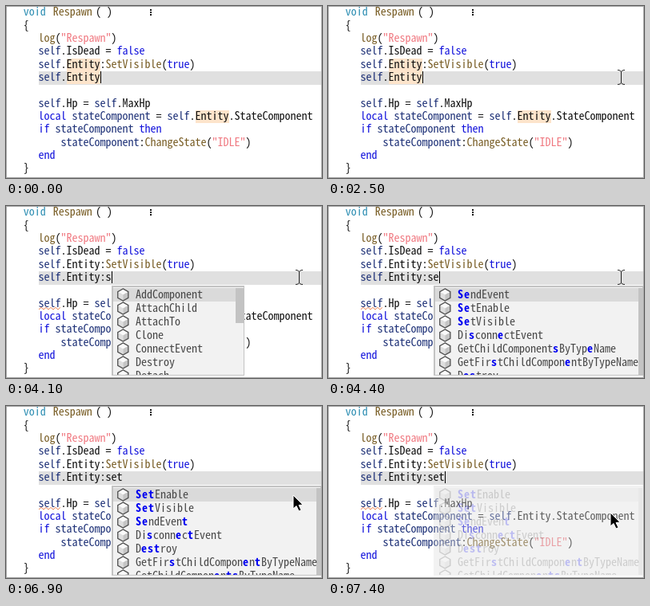
An HTML page with a canvas for the animation above (8 s loop, 395 px wide and 216 px high).

```html
<!DOCTYPE html>
<html lang="en">
<head>
<meta charset="utf-8">
<title>Code completion</title>
<style>
html, body { margin: 0; width: 100%; height: 100%; overflow: hidden; background: #fff; }
canvas { display: block; width: 395px; height: 216px; }
</style>
</head>
<body>
<canvas id="stage"></canvas>
<script>
const W = 395, H = 216, LOOP = 8000, CW = 7, LEFT = 41;
const canvas = document.getElementById('stage');
const ctx = canvas.getContext('2d');
const dpr = window.devicePixelRatio || 1;
canvas.width = W * dpr;
canvas.height = H * dpr;

const FAMILY = '"Noto Sans Mono CJK KR", "Noto Sans Mono CJK JP", "Noto Sans Mono", monospace';
ctx.font = `100px ${FAMILY}`;
const SIZE = CW * 100 / ctx.measureText('0').width;

const INK = '#111111', VAR = '#1f3278', KEY = '#1414dc', FN = '#795e26',
      STR = '#f07a82', TYPE = '#2f8fb3', MATCH = '#0000f0', ITEM = '#484848';

const SELF = ['self', VAR];
const CODE = [
  [2, ['log', FN], ['('], ['"Respawn"', STR], [')']],
  [3, SELF, ['.IsDead = '], ['false', KEY]],
  [4, SELF, ['.Entity:'], ['SetVisible', FN], ['('], ['true', KEY], [')']],
  [7, SELF, ['.Hp = '], SELF, ['.MaxHp']],
  [8, ['local ', KEY], ['stateComponent', VAR], [' = '], SELF, ['.Entity.StateComponent']],
  [9, ['if ', KEY], ['stateComponent ', VAR], ['then', KEY]],
  [10, ['    '], ['stateComponent', VAR], [':'], ['ChangeState', FN], ['('], ['"IDLE"', STR], [')']],
  [11, ['end', KEY]]
];

// Completion lists: label followed by the matched letter positions
const ALL = ['AddComponent', 'AttachChild', 'AttachTo', 'Clone', 'ConnectEvent', 'Destroy', 'Detach'].map(s => [s]);
const LIST_SE = [
  ['SendEvent', 0, 1], ['SetEnable', 0, 1], ['SetVisible', 0, 1], ['DisconnectEvent', 2, 7],
  ['GetChildComponentsByTypeName', 17, 23], ['GetFirstChildComponentByTypeName', 6, 19], ['Destroy', 1, 2]
];
const LIST_S = LIST_SE.map(([s, a, b]) => s === 'Destroy' ? [s, b] : [s, a]);
const LIST_SET = [
  ['SetEnable', 0, 1, 2], ['SetVisible', 0, 1, 2], ['SendEvent', 0, 1, 8], ['DisconnectEvent', 2, 7, 9],
  ['Destroy', 1, 2, 3], ['GetFirstChildComponentByTypeName', 6, 19, 21], ['GetChildComponentsByTypeName', 14, 16, 17]
];

// Timelines: [start, value...]
const TYPED = [[0, ''], [3100, ':'], [4100, ':s'], [4400, ':se'], [4900, ':set']];
const LISTS = [[0, null], [3100, ALL], [4200, LIST_S], [4400, LIST_SE], [5000, LIST_SET]];
const CARET = [[0, 1], [400, 0], [900, 1], [2000, 0], [2500, 1], [3600, 0], [4100, 1],
               [5500, 0], [6000, 1], [6600, 0], [7100, 1]];
const MOUSE = [[0, 0, -60], [900, 385, 132], [1000, 381, 104], [1100, 376, 85], [1200, 373, 99],
               [1500, 366, 89], [6900, 359, 112], [7000, 356, 122], [7100, 353, 134]];

function at(track, t) {
  let step = track[0];
  for (const s of track) if (s[0] <= t) step = s;
  return step;
}

const baseline = row => Math.round(94 + (row - 5) * 16.35);

function rect(x, y, w, h, color) {
  ctx.fillStyle = color;
  ctx.fillRect(x, y, w, h);
}

function text(s, x, y, color = INK, weight = 400) {
  ctx.font = `${weight} ${SIZE}px ${FAMILY}`;
  ctx.fillStyle = color;
  ctx.fillText(s, x, y);
}

function codeLine(row, parts) {
  let x = LEFT - 0.5;
  for (const [s, color] of parts) {
    text(s, x, baseline(row), color);
    x += s.length * CW;
  }
}

function polygon(points, fill, stroke, width = 1) {
  ctx.beginPath();
  points.forEach(([x, y]) => ctx.lineTo(x, y));
  ctx.closePath();
  ctx.fillStyle = fill;
  ctx.fill();
  if (stroke) {
    ctx.strokeStyle = stroke;
    ctx.lineWidth = width;
    ctx.stroke();
  }
}

function cube(x, y) {
  const v = [0, 1, 2, 3, 4, 5].map(i => {
    const a = (i - 1.5) * Math.PI / 3;
    return [x + 7.6 * Math.cos(a), y + 7.6 * Math.sin(a)];
  });
  const mid = [x, y];
  polygon([v[5], v[0], v[1], mid], '#fafafa');
  polygon([v[1], v[2], v[3], mid], '#c4c4c4');
  polygon([v[3], v[4], v[5], mid], '#dedede');
  polygon(v, 'transparent', '#505050', 1.3);
}

function squiggle(x0, x1, y) {
  ctx.beginPath();
  for (let x = x0, i = 0; x <= x1; x += 3, i++) ctx.lineTo(x, y + (i % 2 ? -1.3 : 1.3));
  ctx.strokeStyle = '#ec8658';
  ctx.lineWidth = 1;
  ctx.stroke();
}

// Matched letters are bold and one pixel wider
function item([label, ...hits], y) {
  let x = 162;
  [...label].forEach((c, i) => {
    const hit = hits.includes(i);
    text(c, x, y, hit ? MATCH : ITEM, hit ? 700 : 400);
    x += hit ? CW + 1 : CW;
  });
}

function popup(list, alpha) {
  const small = list === ALL;
  const x = 132, y = 100, h = 113;
  const w = small ? 166 : 262, bar = small ? 287 : 388;
  ctx.save();
  ctx.globalAlpha = alpha;
  rect(x, y, w, h, '#c3c3c3');
  ctx.beginPath();
  ctx.rect(x + 2, y + 2, w - 3, h - 3);
  ctx.clip();
  rect(x, y, w, h, '#f2f2f2');
  rect(x, y + 3, bar - x, 17, '#dadada');
  rect(bar, y + 3, w, small ? 44 : h, '#c3c3c3');
  list.forEach((entry, i) => {
    const base = 116 + i * 17;
    cube(146.3, base - 4.5);
    item(entry, base);
  });
  ctx.restore();
}

function beam(x, y) {
  ctx.beginPath();
  for (const side of [-1, 1]) {
    for (const end of [-1, 1]) {
      ctx.moveTo(x + 0.5 + side * 4.5, y + 0.5 + end * 9);
      ctx.quadraticCurveTo(x + 0.5, y + 0.5 + end * 9, x + 0.5, y + 0.5 + end * 6);
    }
  }
  ctx.moveTo(x + 0.5, y - 6);
  ctx.lineTo(x + 0.5, y + 7);
  ctx.strokeStyle = '#222';
  ctx.lineWidth = 1;
  ctx.stroke();
}

function arrow(x, y) {
  const shape = [[0, 0], [0, 17], [4, 13.5], [7, 20], [10, 18.7], [7, 12.5], [12, 12]];
  polygon(shape.map(([a, b]) => [x + a, y + b]), '#000', '#fff');
}

function draw(t) {
  const typed = at(TYPED, t)[1], list = at(LISTS, t)[1];
  const [since, mx, my] = at(MOUSE, t);

  ctx.setTransform(dpr, 0, 0, dpr, 0, 0);
  rect(0, 0, W, H, '#fff');
  rect(LEFT, 82, W - LEFT, 17, '#e0e0e0');
  if (!typed) {
    for (const [x, row] of [[76, 4], [76, 5], [237, 8]]) {
      rect(x, baseline(row) - 12, 42, 16, '#fde4cb');
    }
  }

  text('void', 21.7, baseline(0), TYPE);
  text('Respawn', 58.7, baseline(0), FN);
  text('( )', 112, baseline(0));
  for (const y of [4, 7, 10]) rect(180, y, 2, 2, '#111');
  text('{', 21.7, baseline(1));
  text('}', 21.7, baseline(12));
  for (const [row, ...parts] of CODE) codeLine(row, parts);
  codeLine(5, [SELF, ['.Entity' + typed]]);

  if (typed) squiggle(LEFT, LEFT + 28, 128.7);
  if (at(CARET, t)[1]) rect(118 + typed.length * CW, 82, 1, 15, '#000');
  if (list) popup(list, t < 7400 ? 1 : 0.22);
  (since < 6900 ? beam : arrow)(mx, my);

  ctx.strokeStyle = '#a6a6a6';
  ctx.lineWidth = 1;
  ctx.strokeRect(0.5, 0.5, W - 1, H - 1);
}

const start = performance.now();
function tick() {
  draw((performance.now() - start) % LOOP);
  requestAnimationFrame(tick);
}
tick();
</script>
</body>
</html>
```
